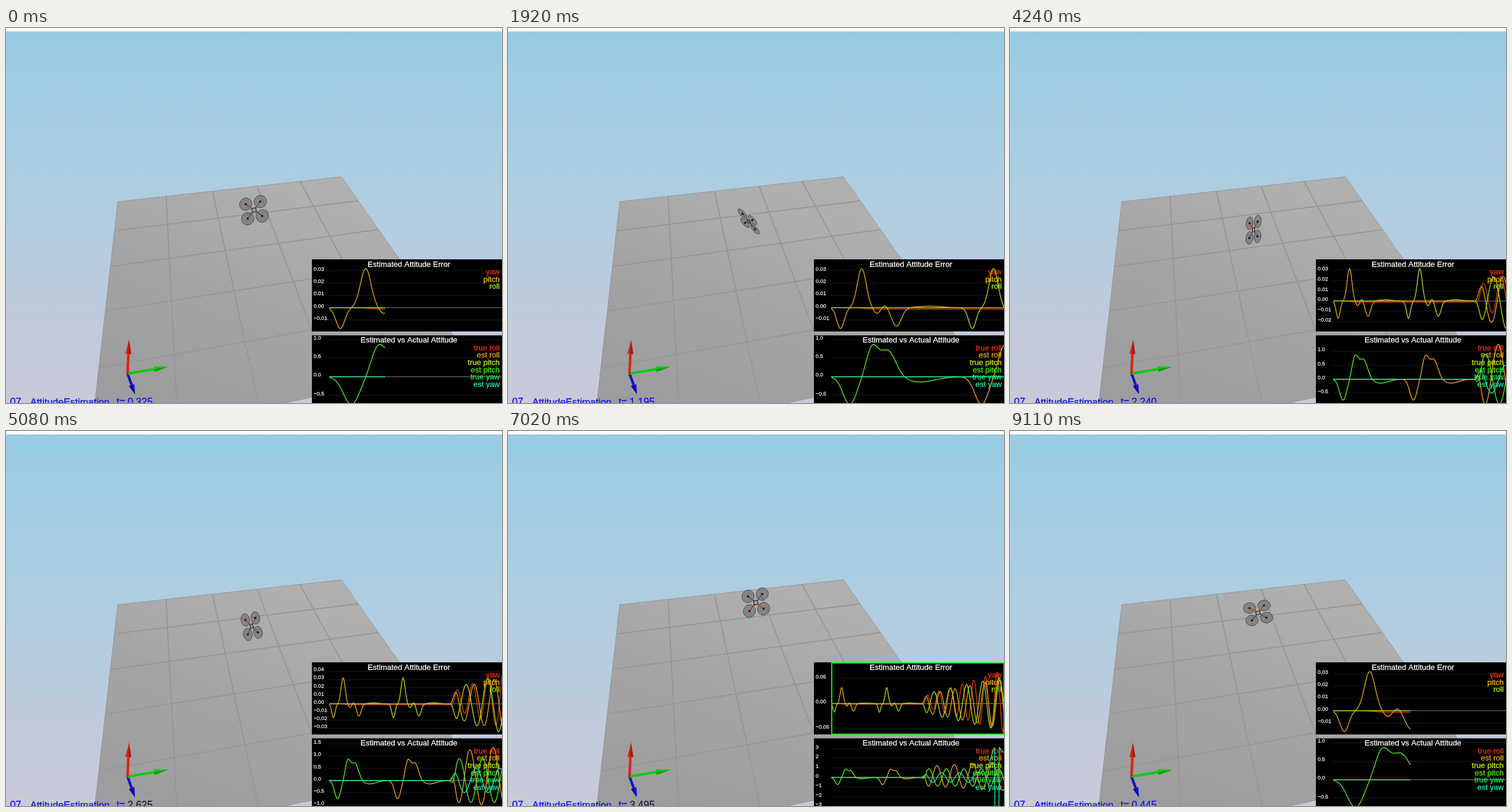
Recreate the animation shown at these times as an HTML page with a canvas. Size 861x650 px, loop 9190 ms.

```html
<!DOCTYPE html>
<html lang="en">
<head>
<meta charset="utf-8">
<title>Attitude estimation</title>
<style>
  html, body { margin: 0; width: 100%; height: 100%; overflow: hidden; background: #fff; }
  canvas { display: block; }
</style>
</head>
<body>
<canvas id="stage" width="861" height="650"></canvas>
<script>
const ctx = document.getElementById('stage').getContext('2d');
const { sin, cos, exp, min, max, floor, PI } = Math;
const LOOP = 9190, STEP = 77.2, RUN = 3.99, SAMPLE = 0.005;
const PULSE_GAP = 0.8875, TUMBLE = 1.78;
const FONT = '"Liberation Sans", Arial, sans-serif';

const smoothstep = (t, from, to) => {
  const s = min(1, max(0, (t - from) / (to - from)));
  return s * s * (3 - 2 * s);
};
// Sum of Gaussian bumps, each [centre, width, height].
const bumps = (t, ...list) =>
  list.reduce((sum, [c, w, h]) => sum + h * exp(-0.5 * ((t - c) / w) ** 2), 0);

// Oscillation that fades in with the tumble; rate is half-cycles per second.
function wave(t, { peak, rate, slowing = 0, size, growth = 0, bias = 0 }) {
  const s = t - peak;
  return smoothstep(t, TUMBLE, 1.9) * (bias + (size + growth * s) * cos(PI * (rate - slowing * s) * s));
}

// One manoeuvre: first about pitch, then the same about roll, then all axes together.
const anglePulse = t => bumps(t, [.125, .045, -.75], [.275, .038, .74], [.38, .055, .72], [.6, .1, -.14]);
const errorPulse = t => bumps(t, [.063, .025, -.017], [.206, .03, .0318], [.308, .022, -.0047],
                                 [.365, .02, .0025], [.44, .033, -.015], [.66, .08, .0012]);

const pitch = t => anglePulse(t) + wave(t, { peak: 1.925, rate: 5.8, size: .9 });
const roll = t => anglePulse(t - PULSE_GAP)
  + wave(t, { peak: 1.918, rate: 6.16, slowing: .47, size: -1.05, growth: -.3, bias: .15 });
const yaw = t => wave(t, { peak: 2, rate: 5.7, size: -.5 }) + PI * smoothstep(t, 2.85, 3.35);
const wrappedYaw = t => yaw(t) > PI ? yaw(t) - 2 * PI : yaw(t);

const pitchError = t => errorPulse(t) + wave(t, { peak: 1.85, rate: 6.8, size: .018, growth: .02 });
const rollError = t => errorPulse(t - PULSE_GAP)
  + wave(t, { peak: 1.865, rate: 6.25, size: -.02, growth: -.022 });
const yawError = t => -.0012 * smoothstep(t, .15, .3)
  + wave(t, { peak: 2.12, rate: 8.7, size: .02, growth: .032, bias: .006 });

const droneX = t => 430.5 + bumps(t, [1.19, .2, -12.5], [2.3, .25, -8], [3.02, .2, -5]);
const droneY = t => 336 + bumps(t, [.4, .3, -21], [2.2, .3, 14], [3.33, .3, -45]);

const sampled = (fn, color) =>
  ({ color, values: Array.from({ length: RUN / SAMPLE + 1 }, (_, i) => fn(i * SAMPLE)) });

const panels = [
  { title: 'Estimated Attitude Error', top: 401, height: 125,
    legend: [['yaw', '#f83010'], ['pitch', '#f8b810'], ['roll', '#a8f010']],
    series: [sampled(yawError, '#cc3c10'), sampled(pitchError, '#d8a018'), sampled(rollError, '#a4d418')] },
  { title: 'Estimated vs Actual Attitude', top: 532.5, height: 125,
    legend: [['true roll', '#f03010'], ['est roll', '#f0a810'], ['true pitch', '#c8f010'],
             ['est pitch', '#50f010'], ['true yaw', '#10f050'], ['est yaw', '#10f0b0']],
    series: [sampled(roll, '#e89c18'), sampled(pitch, '#50e818'), sampled(wrappedYaw, '#10e8a8')] }
];

function polygon(points, color) {
  ctx.fillStyle = color;
  ctx.beginPath();
  points.forEach(p => ctx.lineTo(...p));
  ctx.closePath();
  ctx.fill();
}
function line(a, b, color, width) {
  ctx.strokeStyle = color;
  ctx.lineWidth = width;
  ctx.beginPath();
  ctx.moveTo(...a);
  ctx.lineTo(...b);
  ctx.stroke();
}
function text(str, x, y, size, color, align = 'left', weight = 0.3) {
  ctx.font = `${size}px ${FONT}`;
  ctx.textAlign = align;
  ctx.fillStyle = ctx.strokeStyle = color;
  ctx.lineWidth = weight;
  ctx.fillText(str, x, y);
  ctx.strokeText(str, x, y);
}
function gradient(x0, y0, x1, y1, ...colors) {
  const g = ctx.createLinearGradient(x0, y0, x1, y1);
  colors.forEach((c, i) => g.addColorStop(i / (colors.length - 1), c));
  return g;
}

// Perspective map of the unit square onto the floor.
const floorPoint = (() => {
  const [x0, y0, x1, y1, x2, y2, x3, y3] = [194, 301, 582, 258, 810.5, 581.5, 146, 721];
  const ax = x1 - x2, bx = x3 - x2, sx = x0 - x1 + x2 - x3;
  const ay = y1 - y2, by = y3 - y2, sy = y0 - y1 + y2 - y3;
  const det = ax * by - bx * ay;
  const g = (sx * by - bx * sy) / det, h = (ax * sy - sx * ay) / det;
  return (u, v) => {
    const w = 1 + g * u + h * v;
    return [(x0 + (x1 - x0 + g * x1) * u + (x3 - x0 + h * x3) * v) / w,
            (y0 + (y1 - y0 + g * y1) * u + (y3 - y0 + h * y3) * v) / w];
  };
})();

function drawScene() {
  ctx.fillStyle = '#fff';
  ctx.fillRect(0, 0, 861, 650);
  ctx.fillStyle = gradient(0, 6, 0, 650, '#98cce4', '#b1cde0', '#cac9d8');
  ctx.fillRect(0, 6, 861, 644);
  polygon([floorPoint(0, 0), floorPoint(1, 0), floorPoint(1, 1), floorPoint(0, 1)],
    gradient(480, 265, 330, 650, '#b1b0af', '#a5a5a6', '#9d9d9f'));
  for (let i = 0; i <= 5; i++) {
    const k = i / 5, width = i % 5 ? 1.8 : 1;
    line(floorPoint(0, k), floorPoint(1, k), '#959597', width);
    line(floorPoint(k, 0), floorPoint(k, 1), '#959597', width);
  }
}

function drawArrow(tip, color, shade) {
  const base = [211, 599], dx = tip[0] - base[0], dy = tip[1] - base[1];
  const length = Math.hypot(dx, dy), head = length > 50 ? 25 : 17;
  const ux = dx / length, uy = dy / length;
  const at = (back, side) => [tip[0] - ux * back - uy * side, tip[1] - uy * back + ux * side];
  line(base, at(head, 0), color, 4.5);
  polygon([at(head, -5), tip, at(head, 5)], color);
  polygon([at(head, 0), tip, at(head, 5)], shade);
}

function drawDrone(t) {
  const RIGHT = [12.6, -2.3], AHEAD = [-2.3, -8], UP = [0, -9.8];
  const project = (a, r, u) => [0, 1].map(i => a * AHEAD[i] + r * RIGHT[i] + u * UP[i]);
  const y = yaw(t), p = pitch(t), r = roll(t);
  const ahead = project(cos(p) * cos(y), cos(p) * sin(y), sin(p));
  const right = project(-sin(y) * cos(r) + sin(p) * cos(y) * sin(r),
                        cos(y) * cos(r) + sin(p) * sin(y) * sin(r), -cos(p) * sin(r));
  const centre = [droneX(t), droneY(t)];
  const at = (f, s) => centre.map((c, i) => c + f * ahead[i] + s * right[i]);
  const corners = [[1, -1], [1, 1], [-1, 1], [-1, -1]];

  for (const [f, s] of corners) {
    ctx.save();
    ctx.transform(...right, ...ahead, ...at(f, s));
    ctx.beginPath();
    ctx.arc(0, 0, 0.85, 0, 7);
    ctx.restore();
    ctx.fillStyle = 'rgba(100,100,104,.55)';
    ctx.fill();
    ctx.strokeStyle = '#464648';
    ctx.lineWidth = 1;
    ctx.stroke();
  }
  for (const [f, s] of corners) {
    line(centre, at(f, s), f > 0 ? '#a4512c' : '#5c5c6c', 2);
    ctx.fillStyle = '#18181c';
    ctx.beginPath();
    ctx.arc(...at(f, s), 1.9, 0, 7);
    ctx.fill();
  }
  polygon(corners.map(([f, s]) => at(f * .28, s * .28)), '#9a9cb0');
  ctx.strokeStyle = '#26262e';
  ctx.lineWidth = 1.3;
  ctx.stroke();
}

function drawPanel({ title, top, height, legend, series }, t) {
  const left = 561, count = max(2, floor(t / SAMPLE) - 1);
  const shown = series.flatMap(({ values }) => values.slice(0, count));
  const low = min(0, ...shown), range = max(max(0, ...shown) - low, 0.001);
  const toY = v => top + 120 - (v - low) / range * 104;
  const toX = i => left + 308 * i * SAMPLE / max(1, t);

  ctx.save();
  ctx.beginPath();
  ctx.rect(531, top, 330, height);
  ctx.clip();
  ctx.fillStyle = '#000';
  ctx.fillRect(531, top, 330, height);

  // Tick spacing is 1 or 5 times a power of ten.
  const power = 10 ** floor(Math.log10(range / 8));
  const step = range / 8 <= 5 * power ? 5 * power : 10 * power;
  const decimals = max(0, -floor(Math.log10(step) + 1e-6));
  for (let n = -12; n <= 12; n++) {
    const y = toY(n * step);
    if (y < top + 6 || y > top + height - 6.5) continue;
    line([left, y], [861, y], n ? '#1e1e1e' : '#848484', 1);
    const label = (n < 0 ? '\u2212' : '') + Math.abs(n * step).toFixed(decimals);
    text(label, 534, y, 9.4, '#f0f0f0');
  }

  text(title, 699.5, top + 12.7, 13.5, '#fff', 'center');
  legend.forEach(([name, color], i) => text(name, 857, top + 26 + i * 12.7, 13.5, color, 'right'));

  ctx.lineWidth = 1.5;
  ctx.lineJoin = 'round';
  for (const { values, color } of series) {
    ctx.strokeStyle = color;
    ctx.beginPath();
    for (let i = 0; i < count; i++) ctx.lineTo(toX(i), toY(values[i]));
    ctx.stroke();
  }
  ctx.restore();
}

function render(ms) {
  const elapsed = 0.3228 + 0.03486 * floor(ms / STEP + 0.25);
  const t = Math.round((elapsed % RUN) / SAMPLE) * SAMPLE;
  drawScene();
  drawArrow([224, 635], '#1212c8', '#0c0c98');
  drawArrow([282, 587], '#14c814', '#0c9c0c');
  drawArrow([213.5, 540], '#d82410', '#a81808');
  drawDrone(t);
  panels.forEach(panel => drawPanel(panel, t));
  if (t >= 3) {
    ctx.strokeStyle = '#0cf00c';
    ctx.lineWidth = 2;
    ctx.strokeRect(562, 402, 299, 123.5);
  }
  const blue = '#1414f0';
  text('07_', 7, 654, 17.5, blue);
  text('AttitudeEstimation', 42, 654, 17.1, blue);
  text('t=', 192, 654, 17.5, blue);
  text(t.toFixed(3), 211, 654, 17.5, t > 2.6 ? '#20203c' : blue);
}

function tick() {
  render(performance.now() % LOOP);
  requestAnimationFrame(tick);
}
tick();
</script>
</body>
</html>
```
